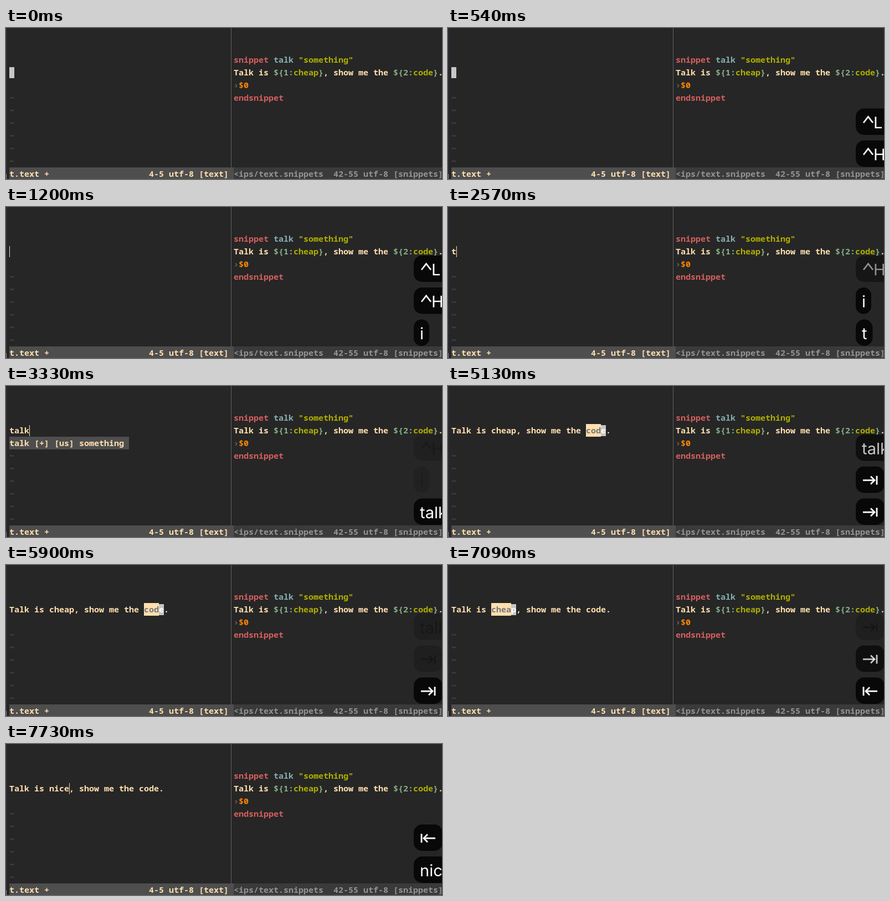
Write an HTML page with a canvas that moves like this. It is 787 px wide and 274 px high and loops after 8000 ms.

```html
<!DOCTYPE html>
<html lang="en">
<head>
<meta charset="utf-8">
<title>Snippet demo</title>
<style>
html, body { margin: 0; width: 100%; height: 100%; overflow: hidden; background: #262626; }
canvas { display: block; }
</style>
</head>
<body>
<canvas id="stage" width="787" height="274"></canvas>
<script>
const ctx = document.getElementById('stage').getContext('2d');
const LOOP = 8000, COL = 9, ROW = 23, LEFT = 6, RIGHT = 411;
const MONO = '600 15px "Noto Sans Mono", monospace';
const SANS = '400 29px Inter, Roboto, sans-serif';
const C = {
  bg: '#262626', fg: '#ffdfaf', red: '#d75f5f', blue: '#87afaf', green: '#afaf00', aqua: '#87af87',
  orange: '#ff8700', bar: '#4e4e4e', dimBar: '#3a3a3a', dim: '#949494', line: '#626262', cursor: '#c6c6c6'
};

// Typed characters as [time, text so far]
const talk = [[2510, 't'], [2740, 'ta'], [2920, 'tal'], [3160, 'talk']];
const nice = [[7210, 'n'], [7380, 'ni'], [7550, 'nic'], [7730, 'nice']];

// Key bubbles: first shown, start of fade, faint remainder after it
const keys = [
  { at: 300, fade: 2340, ghost: 0, label: '^L' },
  { at: 540, fade: 2530, ghost: .18, label: '^H' },
  { at: 1140, fade: 3160, ghost: .15, label: 'i' },
  { at: 2510, fade: 5130, ghost: .2, typed: talk },
  { at: 3750, fade: 5780, ghost: .25, label: '⇥' },
  { at: 5130, fade: 7090, ghost: 0, label: '⇥' },
  { at: 6310, fade: LOOP, ghost: 0, label: '⇤' },
  { at: 7210, fade: LOOP, ghost: 0, typed: nice }
];

const snippet = [
  [2, ['snippet ', C.red], ['talk ', C.blue], ['"something"', C.green]],
  [3, ['Talk is ', C.fg], ['${1:', C.aqua], ['cheap', C.green], ['}', C.aqua],
    [', show me the ', C.fg], ['${2:', C.aqua], ['code', C.green], ['}', C.aqua], ['.', C.fg]],
  [4, ['›', C.line], ['$0', C.orange]],
  [5, ['endsnippet', C.red]]
];

const typedAt = (list, t) => list.reduce((s, [at, text]) => t >= at ? text : s, '');

function rect(x, y, w, h, color) {
  ctx.fillStyle = color;
  ctx.fillRect(x, y, w, h);
}

function text(s, x, row, color) {
  ctx.font = MONO;
  ctx.fillStyle = color;
  ctx.fillText(s, x, 17 + ROW * row);
}

function block(x, row, char = '') {
  rect(x, row * ROW + 2, COL, 20, C.cursor);
  text(char, x, row, '#fff');
}

const caret = col => rect(LEFT + col * COL, 71, 1, 20, C.fg);

function select(line, word) {
  const x = LEFT + line.indexOf(word) * COL, n = word.length - 1;
  rect(x, 69, n * COL, ROW, C.fg);
  text(word.slice(0, n), x, 3, '#767676');
  rect(x + n * COL, 69, COL, ROW, C.bg);
  block(x + n * COL, 3, word[n]);
}

function status(x, w, active, name, info, infoX) {
  rect(x, 253, w, 21, active ? C.bar : C.dimBar);
  const color = active ? C.fg : C.dim;
  text(name, x, 11, color);
  text(info, infoX, 11, color);
}

function path(...points) {
  ctx.beginPath();
  points.forEach(([x, y]) => ctx.lineTo(x, y));
  ctx.stroke();
}

function glyph(label, y, color) {
  ctx.fillStyle = ctx.strokeStyle = color;
  ctx.lineWidth = 2.8;
  if (label === '⇥' || label === '⇤') {
    ctx.save();
    ctx.translate(762, y + 25);
    if (label === '⇤') ctx.scale(-1, 1);
    path([-13, 0], [8, 0]);
    path([1, -7], [8, 0], [1, 7]);
    path([12, -8], [12, 8]);
    ctx.restore();
    return;
  }
  let x = 747;
  if (label[0] === '^') {
    path([750, y + 26], [758.5, y + 15], [767, y + 26]);
    label = label[1];
    x = 768;
  }
  ctx.font = SANS;
  ctx.fillText(label, x, y + 36);
}

function bubble(key, y, t) {
  const label = key.typed ? typedAt(key.typed, t) : key.label;
  const alpha = t < key.fade ? 1 : Math.max(0, .78 - (t - key.fade) / 160);
  const ghost = alpha <= key.ghost;
  ctx.font = SANS;
  const wide = '^⇥⇤'.includes(label[0]);
  const w = wide ? (label[0] === '^' ? 70 : 52) : ctx.measureText(label).width + 21;
  ctx.globalAlpha = Math.max(alpha, key.ghost);
  ctx.fillStyle = '#080808';
  ctx.beginPath();
  ctx.roundRect(736, y, w, 48, Math.min(15, w / 2));
  ctx.fill();
  if (ghost) ctx.globalAlpha = key.ghost * 1.5;
  glyph(label, y, ghost ? '#080808' : '#fff');
  ctx.globalAlpha = 1;
}

function leftPane(t, focused) {
  for (let row = 5; row < 11; row++) text('~', LEFT, row, C.bar);
  if (t < 1140) {
    if (focused) block(LEFT, 3);
  } else if (t < 3750) {
    const word = typedAt(talk, t);
    text(word, LEFT, 3, C.fg);
    caret(word.length);
    if (t >= 2740) {
      rect(LEFT, 92, 216, ROW, C.bar);
      text('talk [+] [us] something', LEFT, 4, C.fg);
    }
  } else {
    const word = typedAt(nice, t);
    const line = `Talk is ${word || 'cheap'}, show me the code.`;
    text(line, LEFT, 3, C.fg);
    if (word) caret(8 + word.length);
    else select(line, t >= 5130 && t < 6310 ? 'code' : 'cheap');
  }
}

function rightPane(focused) {
  for (const [row, ...parts] of snippet) {
    let x = RIGHT;
    for (const [s, color] of parts) {
      text(s, x, row, color);
      x += s.length * COL;
    }
  }
  if (focused) block(RIGHT, 2, 's');
}

function draw(t) {
  const onRight = t >= 300 && t < 540;
  rect(0, 0, 787, 274, C.bg);
  rect(0, 0, 2, 274, '#2a2a36');
  rect(0, 265, 1, 9, '#8a8a8a');
  leftPane(t, !onRight);
  rightPane(onRight);
  rect(406, 0, 1, 253, C.line);
  status(LEFT, 405, !onRight, 't.text +', '4-5 utf-8 [text]', 258);
  status(RIGHT, 376, onRight, '<ips/text.snippets', '42-55 utf-8 [snippets]', 591);
  const shown = keys.filter(k => t >= k.at).slice(-3).reverse();
  shown.forEach((key, i) => bubble(key, 204 - 58 * i, t));
}

const start = performance.now();
function tick() {
  draw((performance.now() - start) % LOOP);
  requestAnimationFrame(tick);
}
tick();
</script>
</body>
</html>
```
